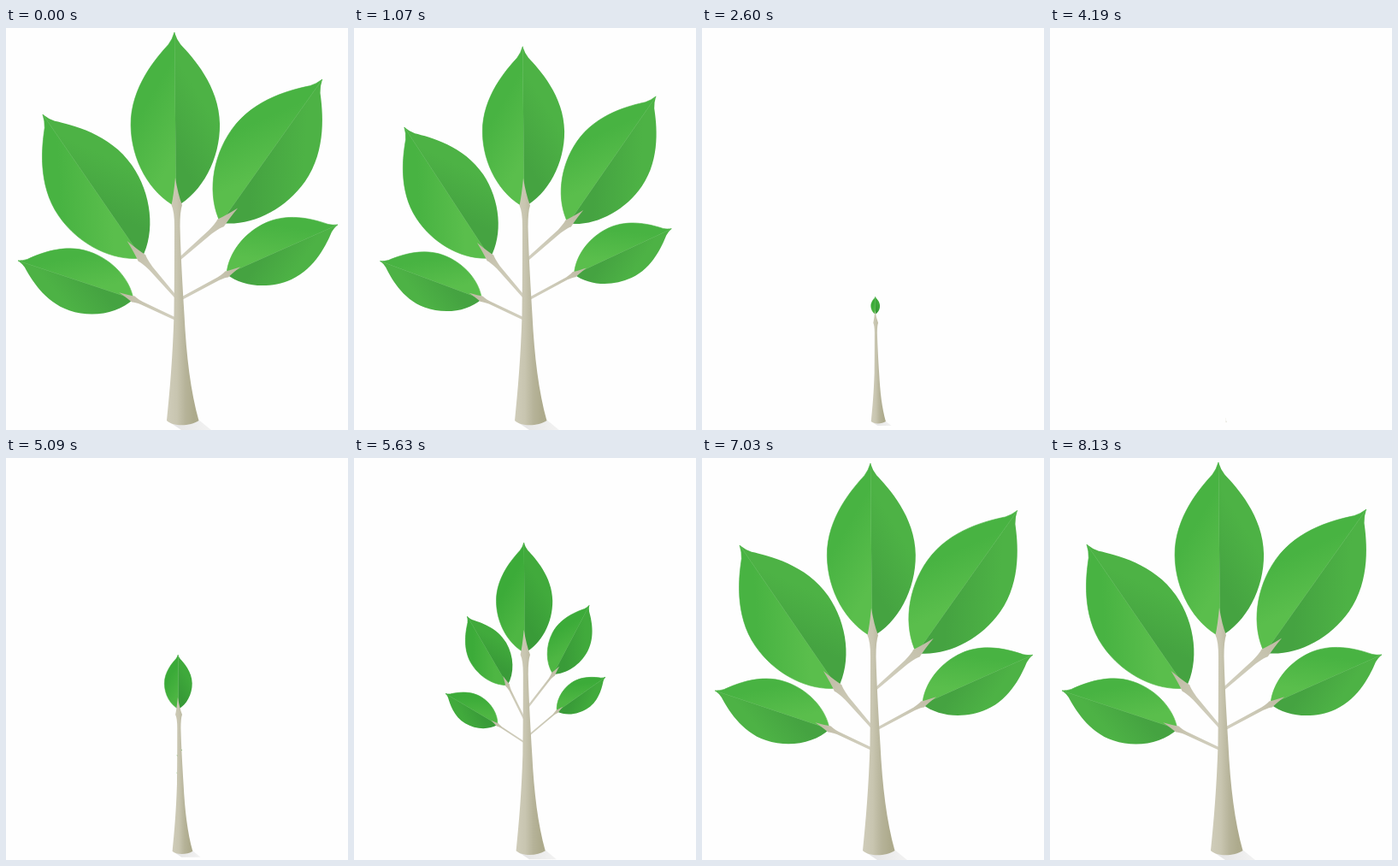
An HTML page with a canvas for the animation above (8.16 s loop, 400 px wide and 470 px high).

```html
<!DOCTYPE html>
<html lang="en">
<head>
<meta charset="utf-8">
<title>Growing tree</title>
<style>
html, body { margin: 0; width: 100%; height: 100%; overflow: hidden; background: #fff; }
canvas { display: block; width: 400px; height: 470px; }
</style>
</head>
<body>
<canvas id="stage"></canvas>
<script>
const LOOP = 8160, GROWN = 7360, SAPLING = 1800, GONE = 3190;
const FOOT = { x: 206, y: 461 };
const canvas = document.getElementById('stage');
const ctx = canvas.getContext('2d');
const dpr = window.devicePixelRatio || 1;
canvas.width = 400 * dpr;
canvas.height = 470 * dpr;

// Curves over u, where 0 is the full tree and GONE is nothing.
const tipCurve = [[0, 0], [700, .023], [830, .05], [970, .105], [1070, .155], [1300, .33], [1530, .57], [1670, .75], [1730, .88], [1800, 1]];
const baseCurve = [[0, 0], [1070, .02], [1400, .28], [1600, .6], [1730, .86], [1800, 1]];
const trunkCurve = [[1800, .895], [2050, .75], [2370, .58], [2500, .515], [2800, .345], [GONE, 0]];
const crownCurve = [[1800, 1], [2050, .92], [2370, .68], [2500, .51], [2800, 0]];
const sideCurve = [[1800, 1], [2280, 0]];

// Each pose: branch origin, leaf base, leaf tip.
const sides = [
  { full: [[198, 340], [149, 317], [14, 272]], bud: [[199, 331], [171, 311], [120, 276]], flip: true },
  { full: [[204, 317], [258, 288], [388, 230]], bud: [[204, 326], [234, 298], [281, 260]] },
  { full: [[199, 315], [159, 269], [43, 101]], bud: [[199, 303], [183, 265], [145, 197]] },
  { full: [[203, 270], [251, 228], [370, 60]], bud: [[204, 294], [230, 257], [262, 188]] }
];
const crown = { full: [[198, 175], [199, 209], [197, 5]], bud: [[200, 205], [200, 231], [199, 112]] };

const mix = (a, b, k) => a + (b - a) * k;
const mixPoint = (p, q, k) => [mix(p[0], q[0], k), mix(p[1], q[1], k)];

function sample(curve, u) {
  if (u <= curve[0][0]) return curve[0][1];
  for (let i = 1; i < curve.length; i++) {
    const [u0, v0] = curve[i - 1], [u1, v1] = curve[i];
    if (u <= u1) return mix(v0, v1, (u - u0) / (u1 - u0));
  }
  return curve[curve.length - 1][1];
}

function pose(part, u, shrink) {
  const k = sample(baseCurve, u);
  const origin = mixPoint(part.full[0], part.bud[0], k);
  const base = mixPoint(part.full[1], part.bud[1], k);
  const tip = mixPoint(part.full[2], part.bud[2], sample(tipCurve, u));
  return [origin, mixPoint(origin, base, shrink), mixPoint(origin, tip, shrink)];
}

function alongAxis(from, to, draw) {
  const dx = to[0] - from[0], dy = to[1] - from[1];
  ctx.save();
  ctx.translate(from[0], from[1]);
  ctx.rotate(Math.atan2(dy, dx));
  draw(Math.hypot(dx, dy));
  ctx.restore();
}

function gradient(x0, y0, x1, y1, colors) {
  const g = ctx.createLinearGradient(x0, y0, x1, y1);
  colors.forEach((c, i) => g.addColorStop(i / (colors.length - 1), c));
  return g;
}

function halfLeaf() {
  ctx.beginPath();
  ctx.moveTo(0, 0);
  ctx.bezierCurveTo(.08, .15, .27, .255, .47, .255);
  ctx.bezierCurveTo(.69, .255, .86, .1, .93, .035);
  ctx.quadraticCurveTo(.96, .012, 1, 0);
  ctx.closePath();
}

function leaf(base, tip, flip, youth) {
  const tone = (r, g, b) => `rgb(${r - 14 * youth},${g - 9 * youth},${b - 10 * youth})`;
  alongAxis(base, tip, len => {
    if (len < .3) return;
    ctx.scale(len, flip ? -len : len);
    // The light half reaches slightly under the dark one to hide the seam.
    ctx.save();
    ctx.scale(1, -1);
    halfLeaf();
    ctx.fillStyle = gradient(.3, 0, .45, .25, [tone(90, 190, 76), tone(72, 179, 66)]);
    ctx.fill();
    ctx.lineWidth = .6 / len;
    ctx.strokeStyle = ctx.fillStyle;
    ctx.stroke();
    ctx.restore();
    halfLeaf();
    ctx.fillStyle = gradient(.3, 0, .45, .25, [tone(69, 163, 65), tone(77, 178, 69)]);
    ctx.fill();
  });
}

function branch(origin, base, leafLength) {
  const spear = leafLength * .13, flare = leafLength * .028, neck = leafLength * .013;
  alongAxis(origin, base, len => {
    const root = Math.min(1.6, neck);
    ctx.beginPath();
    ctx.moveTo(0, -root);
    ctx.lineTo(len - spear * .6, -neck);
    ctx.quadraticCurveTo(len - spear * .1, -flare * .7, len, -flare);
    ctx.quadraticCurveTo(len + spear * .35, -flare * .5, len + spear, 0);
    ctx.quadraticCurveTo(len + spear * .35, flare * .5, len, flare);
    ctx.quadraticCurveTo(len - spear * .1, flare * .7, len - spear * .6, neck);
    ctx.lineTo(0, root);
    ctx.closePath();
    ctx.fillStyle = gradient(0, 0, len + spear, 0, ['#d2cfbf', '#cbc8b5', '#bebaa3']);
    ctx.fill();
  });
}

function trunk() {
  ctx.beginPath();
  ctx.moveTo(193, 462);
  ctx.lineTo(224, 457);
  ctx.lineTo(240, 470);
  ctx.lineTo(205, 470);
  ctx.closePath();
  ctx.fillStyle = gradient(200, 0, 240, 0, ['#e6e6e6', '#f2f2f2']);
  ctx.fill();

  ctx.beginPath();
  ctx.moveTo(198, 175);
  ctx.quadraticCurveTo(196, 196, 193.5, 207);
  ctx.quadraticCurveTo(197, 214, 197, 232);
  ctx.bezierCurveTo(197, 270, 197, 300, 196.5, 335);
  ctx.bezierCurveTo(195, 385, 191.5, 425, 188, 459);
  ctx.bezierCurveTo(195, 466, 215, 466, 225.5, 459);
  ctx.bezierCurveTo(216, 425, 211, 385, 208.5, 335);
  ctx.bezierCurveTo(206.5, 300, 204.5, 270, 203.5, 232);
  ctx.quadraticCurveTo(203.5, 214, 206, 207);
  ctx.quadraticCurveTo(201, 194, 198, 175);
  ctx.closePath();
  ctx.fillStyle = gradient(190, 0, 220, 0, ['#cecbb8', '#c8c5b0', '#b6b399', '#adaa8c']);
  ctx.fill();
}

function scaleAtFoot(s, draw) {
  ctx.save();
  ctx.translate(FOOT.x, FOOT.y);
  ctx.scale(s, s);
  ctx.translate(-FOOT.x, -FOOT.y);
  draw();
  ctx.restore();
}

function render(t) {
  // Growing runs the shrinking backwards, then holds the full tree.
  const u = Math.max(0, Math.min(t, GROWN - t, GONE));
  const youth = sample(baseCurve, u);
  const size = u < SAPLING ? 1 - .105 * youth : sample(trunkCurve, u);
  ctx.setTransform(dpr, 0, 0, dpr, 0, 0);
  ctx.fillStyle = '#fefefe';
  ctx.fillRect(0, 0, 400, 470);
  if (size <= 0) return;

  scaleAtFoot(u < SAPLING ? 1 : size / .895, () => {
    const shrink = sample(sideCurve, u);
    if (shrink > 0) for (const part of sides) {
      const [origin, base, tip] = pose(part, u, shrink);
      leaf(base, tip, part.flip, youth);
      branch(origin, base, Math.hypot(tip[0] - base[0], tip[1] - base[1]));
    }
    const [, base, tip] = pose(crown, u, sample(crownCurve, u));
    leaf(base, tip, false, youth);
  });
  scaleAtFoot(size, trunk);
}

const start = performance.now();
function tick() {
  render((performance.now() - start) % LOOP);
  requestAnimationFrame(tick);
}
tick();
</script>
</body>
</html>
```
